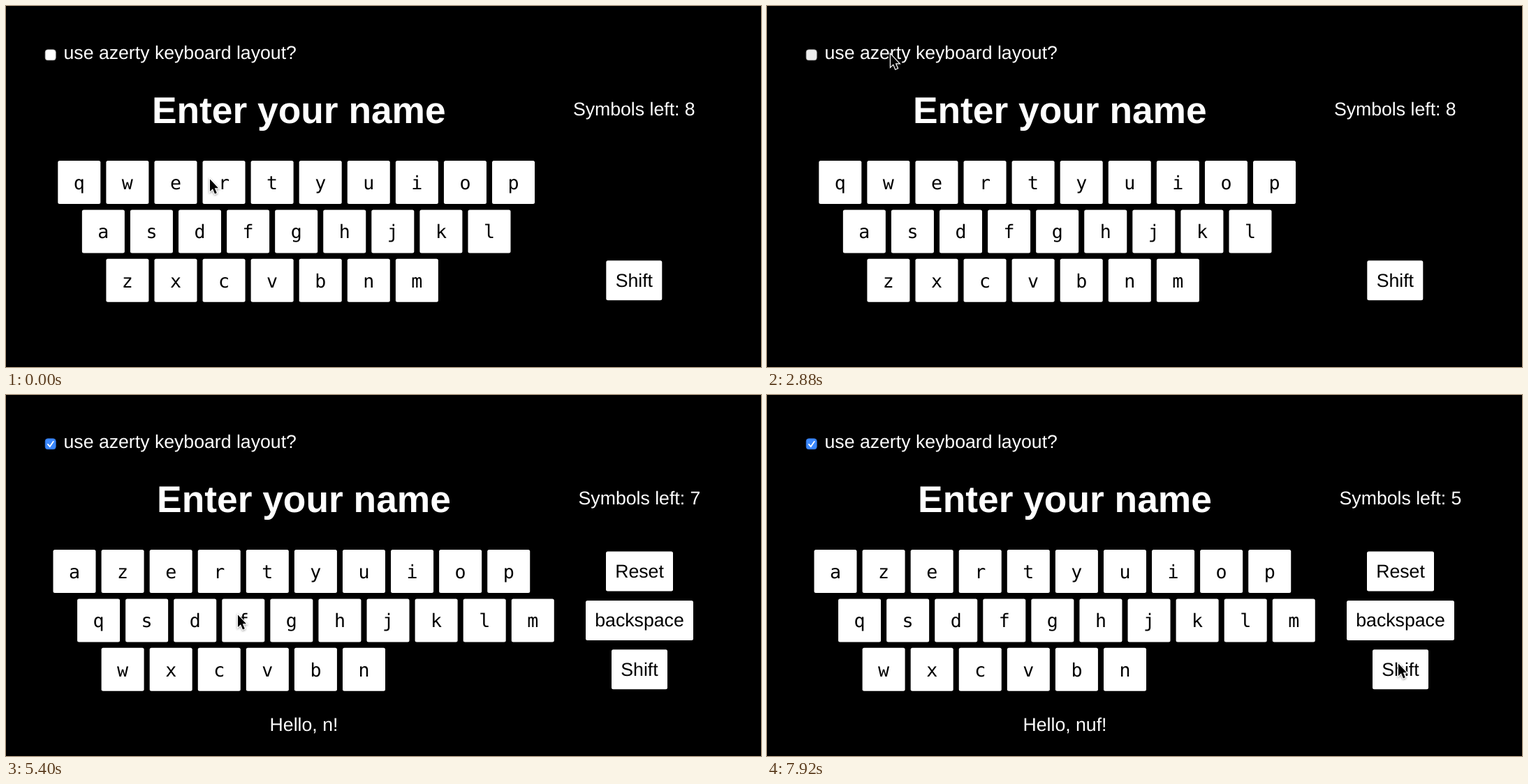
Animation of 1081x518 px, one loop 8000 ms. Source, as an HTML page:

```html
<!DOCTYPE html>
<html lang="en">
<head>
<meta charset="utf-8">
<title>Virtual keyboard</title>
<style>
  html, body { margin: 0; width: 100%; height: 100%; overflow: hidden; background: #000; }
  svg { display: block; font: 26.67px "Liberation Sans", Arial, sans-serif; fill: #fff; }
  text { white-space: pre; text-rendering: geometricPrecision; }
  .middle { text-anchor: middle; }
  .title { font-size: 53.33px; font-weight: bold; }
  .dark { fill: #000; }
  .letter { font-family: "DejaVu Sans Mono", monospace; }
  .pointer {
    fill: #000; stroke: #fff; stroke-width: 2.4; paint-order: stroke;
    filter: drop-shadow(0 1.5px 1.5px rgba(0, 0, 0, .4));
  }
</style>
</head>
<body>
<svg id="stage" width="1081" height="518" viewBox="0 0 1081 518"></svg>
<script>
const LOOP = 8000, STEP = 120;
const PRESS = 24, SWITCH = 25;   // steps at which the checkbox is pressed and toggled
const TYPED = [42, 52, 60];      // steps at which each letter appears
const NAME = "nuf";
const QWERTY = ["qwertyuiop", "asdfghjkl", "zxcvbnm"];
const AZERTY = ["azertyuiop", "qsdfghjklm", "wxcvbn"];

const stage = document.getElementById("stage");

// Pointer stops after the circling: where it goes, from which step to which
const STOPS = [
  { x: 176, y: 68, from: 22, to: 23 },
  { x: 350, y: 197, from: 28, to: 33 },
  { x: 366, y: 280, from: 33, to: 35 },
  { x: 268, y: 316, from: 35, to: 39 },
  { x: 331, y: 314, from: 44, to: 45 },
  { x: 919, y: 318, from: 45, to: 48 },
  { x: 640, y: 242, from: 48, to: 52 },
  { x: 376, y: 250, from: 53, to: 58 },
  { x: 919, y: 384, from: 61, to: 65 },
  { x: 903, y: 384, from: 65, to: 66 }
];

const smooth = k => k * k * (3 - 2 * k);
const clamp = k => Math.min(1, Math.max(0, k));

// Shrinking loops, held near the upper left corner
function circling(step) {
  const size = Math.min(1, Math.exp((6 - step) / 11));
  const angle = -2 * Math.PI * (step - 12.75) / 7.5;
  return {
    x: 140 + 412 * size * (1 + Math.cos(angle)),
    y: 66 + 155 * size * (1 + Math.sin(angle))
  };
}

function pointerAt(step) {
  if (step < 3) return step < 1 ? { x: 291, y: 247 } : { x: 332, y: 245 };
  return STOPS.reduce((at, stop) => {
    const k = smooth(clamp((step - stop.from) / (stop.to - stop.from)));
    return { x: at.x + (stop.x - at.x) * k, y: at.y + (stop.y - at.y) * k };
  }, circling(step));
}

const label = (x, y, text, style = "middle") => `<text x="${x}" y="${y}" class="${style}">${text}</text>`;

const box = (x, y, width, height) =>
  `<rect x="${x}" y="${y}" width="${width}" height="${height}" rx="2.5"/>`;

const button = (center, y, width, text) =>
  box(center - width / 2, y, width, 57) + label(center, y + 37.3, text, "middle dark");

function keyboard(rows, left) {
  return rows.map((row, r) => [...row].map((letter, c) => {
    const x = left + r * 34.55 + c * 69.08, y = 222 + r * 70.4;
    return box(x, y, 61, 62) + label(x + 30.5, y + 41, letter, "middle dark letter");
  }).join("")).join("");
}

function checkbox(checked, pressed) {
  const fill = checked ? "#3b88fd" : pressed ? "#eee" : "#fff";
  const edge = checked ? "#3479e8" : "#bbb";
  const tick = '<path d="M60 70.8l2.8 3.2 5-7.3" fill="none" stroke="#fff" stroke-width="1.8" stroke-linecap="round"/>';
  return `<rect x="56.2" y="62.7" width="15" height="15" rx="3.5" fill="${fill}" stroke="${edge}" stroke-width=".8"/>`
    + (checked ? tick : "");
}

const pointer = ({ x, y }) => `<path class="pointer" transform="translate(${x} ${y})"
  d="M1 1.5V19L5 15.2 8 22.4 10.8 21.2 7.8 14.2H13Z"/>`;

function scene(step) {
  const azerty = step >= SWITCH;
  const typed = NAME.slice(0, TYPED.filter(s => step >= s).length);
  const center = azerty ? 426.5 : 419.3;
  const side = azerty ? 907 : 899.3;
  return checkbox(azerty, step >= PRESS)
    + label(82.5, 76, "use azerty keyboard layout?", "")
    + label(center, 168, "Enter your name", "middle title")
    + label(side, 157, `Symbols left: ${8 - typed.length}`)
    + keyboard(azerty ? AZERTY : QWERTY, azerty ? 67.5 : 74.3)
    + (typed && button(side, 224.5, 96, "Reset") + button(side, 295, 154, "backspace")
      + label(center, 482, `Hello, ${typed}!`))
    + button(side, 365.2, 80, "Shift")
    + pointer(pointerAt(step));
}

let shown = -1;
function draw() {
  const step = Math.floor(performance.now() % LOOP / STEP);
  if (step !== shown) stage.innerHTML = scene(shown = step);
  requestAnimationFrame(draw);
}
draw();
</script>
</body>
</html>
```
